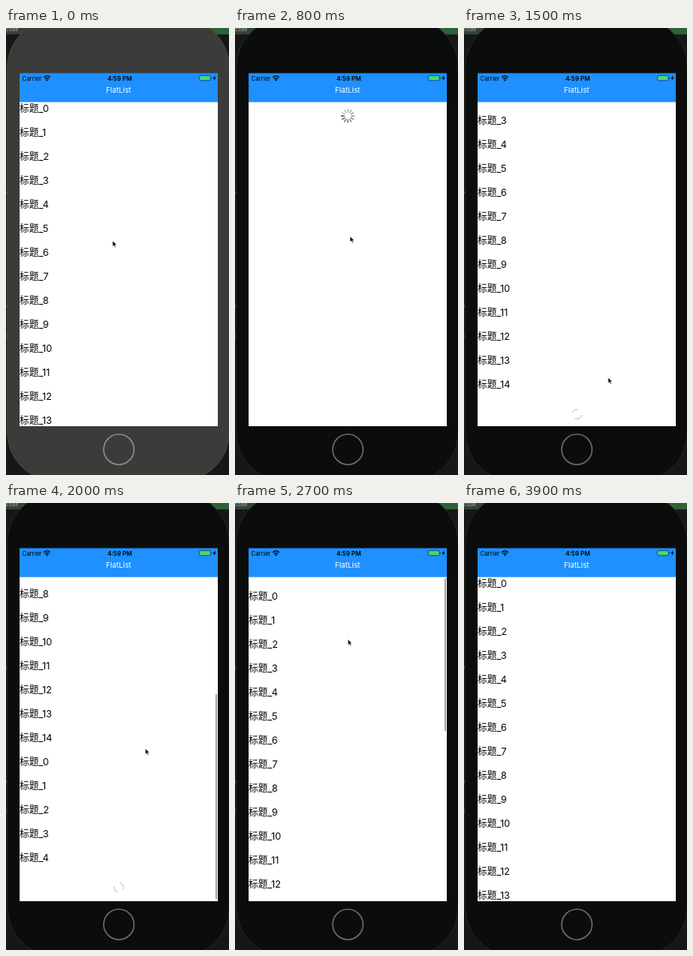
Animation of 279x559 px, one loop 4 s. Source, as an HTML page:

```html
<!DOCTYPE html>
<html lang="zh-CN">
<head>
<meta charset="utf-8">
<title>List refresh</title>
<style>
  html, body { margin: 0; width: 100%; height: 100%; overflow: hidden; background: #171717; }
  svg { display: block; width: 279px; height: 559px; }
  text { font-family: Inter, "Noto Sans CJK SC", "Noto Sans CJK", sans-serif; }
  .row { font-size: 12px; }
</style>
</head>
<body>
<svg viewBox="0 0 279 559">
  <defs>
    <clipPath id="view"><rect x="17" y="93" width="248" height="405"/></clipPath>
  </defs>

  <!-- window behind the phone -->
  <rect width="279" height="559" fill="#171717"/>
  <rect width="279" height="8" fill="#2d6236"/>
  <rect width="30" height="8" fill="#344338"/>
  <text x="0" y="4" font-size="6.5" fill="#a9a9a9">code</text>
  <g font-size="7" fill="#8c8c8c">
    <text x="-2.5" y="207">s</text>
    <text x="-2.5" y="350">s</text>
    <text x="-2.5" y="387">c</text>
  </g>

  <!-- phone -->
  <rect id="body" x="1.5" y="-12" width="278" height="579" rx="62"/>
  <circle id="home" cx="141.2" cy="527" r="19" fill="none" stroke-width="1.6"/>
  <rect x="17" y="57" width="248" height="441" fill="#fff"/>

  <!-- list -->
  <g clip-path="url(#view)">
    <g id="spinner"></g>
    <g id="list">
      <rect x="17" y="93" width="248" height="900" fill="#fff"/>
      <g id="footer" fill="none" stroke="#bdbdbd">
        <path d="M1 -6A6 6 0 0 1 5.4 2.6M-1.5 5.8A6 6 0 0 1 -5.8 -1.5"/>
      </g>
    </g>
    <rect id="bar" x="262.2" width="1.8" rx="0.9" fill="#9c9c9c"/>
  </g>

  <!-- header -->
  <rect x="17" y="56.5" width="248" height="36.5" fill="#1e90ff"/>
  <rect x="17" y="92" width="248" height="1" fill="#6bb5fb"/>
  <text x="20.3" y="65.9" font-size="7.4">Carrier</text>
  <path d="M47.2 61.8Q51.3 58 55.4 61.8M48.9 63.7Q51.3 61.5 53.7 63.7" fill="none" stroke="#000" stroke-width="1.3"/>
  <path d="M49.9 64.9Q51.3 63.8 52.7 64.9L51.3 66.4Z"/>
  <text x="142.3" y="65.8" font-size="7.6" font-weight="600" text-anchor="middle">4:59 PM</text>
  <rect x="241.9" y="59.4" width="14" height="6.4" rx="1.8" fill="none" stroke="#174a78" stroke-width="0.8"/>
  <rect x="242.8" y="60.2" width="12.2" height="4.8" rx="1" fill="#4cd964"/>
  <rect x="256.6" y="61.4" width="1" height="2.4" rx="0.5" fill="#174a78"/>
  <path d="M261.8 59.2L258.8 63H260.5L259.8 66L262.8 62.1H261.1Z"/>
  <text x="140.8" y="80.8" font-size="9.4" fill="#fff" text-anchor="middle">FlatList</text>

  <path id="cursor" d="M0 0V8L1.9 6.3L3.2 9.2L4.6 8.6L3.3 5.8H5.8Z" stroke="#fff" stroke-width="0.6"/>
</svg>

<script>
const LOOP = 4000, STEP = 100;
const TOP = 93, VIEW_H = 405, TRACK = 403, ROW_H = 30, PAGE = 15, FOOT_H = 32;
const HOLD = 34, SPIN = 1100, CENTER = 141.2;
const $ = id => document.getElementById(id);

const clamp = v => Math.min(1, Math.max(0, v));
const ramp = (t, from, to) => {
  const p = clamp((t - from) / (to - from));
  return p * p * (3 - 2 * p);
};
const bump = (t, from, to) => Math.sin(Math.PI * clamp((t - from) / (to - from))) ** 2;

// pull and refresh, two scrolls to the end, back to the top with a bounce
function scroll(t) {
  return HOLD * (ramp(t, 1000, 1100) - ramp(t, 300, 500))
    + 75 * ramp(t, 1200, 1400)
    + 152 * ramp(t, 1600, 2000)
    - 227 * ramp(t, 2200, 2600)
    - 38 * bump(t, 2600, 3040);
}

function rowCount(t) {
  if (t >= 700 && t < 1000) return 0;
  return PAGE + 5 * ((t >= 1600) + (t >= 2200));
}

// the pointer glides between these stops
const stops = [
  { t: 300, x: 133.3, y: 266 },
  { t: 800, x: 144, y: 260.5 },
  { t: 1500, x: 180.3, y: 437 },
  { t: 2000, x: 174.3, y: 307 },
  { t: 2700, x: 141.3, y: 170.5 },
  { t: 3000, x: 133.3, y: 546.3 },
  { t: 3800, x: 4, y: 60 }
];

function pointer(t) {
  const pos = { x: stops[0].x, y: stops[0].y };
  for (let i = 1; i < stops.length; i++) {
    const a = stops[i - 1], b = stops[i], p = ramp(t, a.t, b.t);
    pos.x += (b.x - a.x) * p;
    pos.y += (b.y - a.y) * p;
  }
  return pos;
}

const set = (el, attrs) => { for (const k in attrs) el.setAttribute(k, attrs[k]); };
const show = (el, on) => set(el, { visibility: on ? "visible" : "hidden" });
const move = (el, x, y, more = "") => set(el, { transform: `translate(${x} ${y}) ${more}` });

function add(parent, tag, attrs) {
  const el = document.createElementNS("http://www.w3.org/2000/svg", tag);
  set(el, attrs);
  return parent.appendChild(el);
}

const rows = Array.from({ length: 25 }, (_, i) => {
  const el = add($("list"), "text", { x: 17, y: 105 + i * ROW_H, class: "row" });
  el.textContent = "标题_" + i % PAGE;
  return el;
});

const ticks = Array.from({ length: 12 }, (_, i) =>
  add($("spinner"), "path", {
    d: "M0 -4.6V-8.2", stroke: "#333", "stroke-width": 1.4,
    "stroke-linecap": "round", transform: `rotate(${i * 30})`
  }));

function draw(time) {
  const t = Math.floor(time % LOOP / STEP) * STEP;
  const lit = t < STEP;
  set($("body"), { fill: lit ? "#3b3b39" : "#0b0d0c", stroke: lit ? "#464644" : "#242424" });
  set($("home"), { stroke: lit ? "#8d8d8a" : "#6c6c6c" });

  const offset = scroll(t), count = rowCount(t);
  const content = count * ROW_H + FOOT_H, pull = Math.max(0, -offset);
  move($("list"), 0, -offset);
  rows.forEach((el, i) => show(el, i < count));
  show($("footer"), count > 0);
  move($("footer"), CENTER, TOP + count * ROW_H + 15, `rotate(${(t - 2000) * 0.54})`);

  // refresh spinner sits in the middle of the pulled gap
  show($("spinner"), pull > 0 && (t <= 1000 || t > 2700));
  move($("spinner"), CENTER, TOP + pull / 2);
  const head = 9 + (t - 800) * 12 / SPIN;
  ticks.forEach((el, i) => {
    const age = ((head - i) % 12 + 12) % 12;
    set(el, { opacity: 0.85 - age * 0.052 });
  });

  // scroll bar shows only while the list moves
  set($("bar"), {
    y: TOP + 1 + Math.max(0, offset) / content * TRACK,
    height: Math.min(TRACK, TRACK * TRACK / content) - pull
  });
  show($("bar"), Math.abs(offset - scroll(t - STEP)) > 0.5);

  const pos = pointer(t);
  move($("cursor"), pos.x, pos.y, "scale(.9)");
  show($("cursor"), t < 3800);
}

const start = performance.now();
function tick() {
  draw(performance.now() - start);
  requestAnimationFrame(tick);
}
tick();
</script>
</body>
</html>
```
